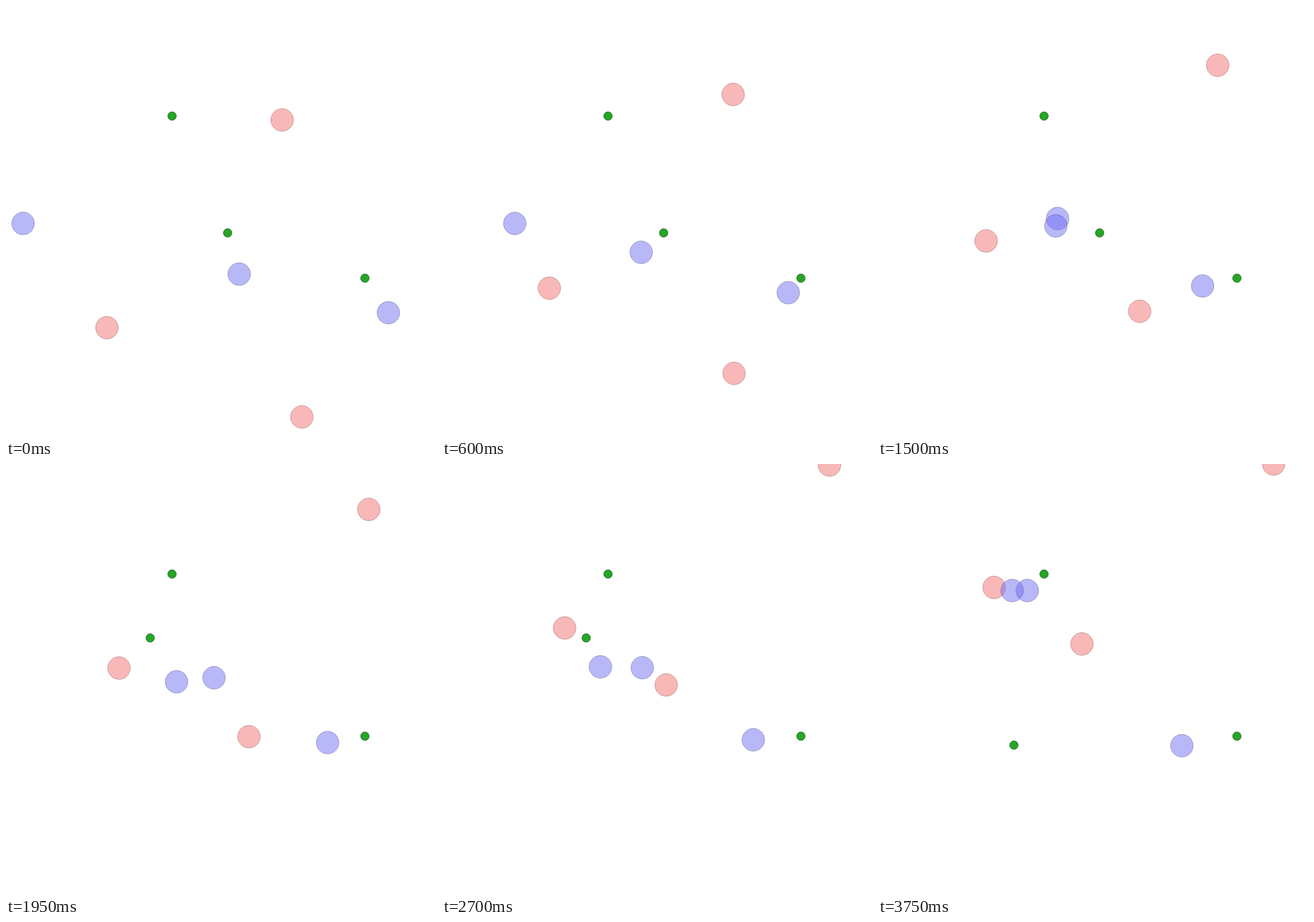
Recreate the animation shown at these times as an HTML page with a canvas. Size 700x700 px, loop 3900 ms.

```html
<!DOCTYPE html>
<html lang="en">
<head>
<meta charset="utf-8">
<title>Particles</title>
<style>
html, body { margin: 0; width: 100%; height: 100%; overflow: hidden; background: #fff; }
canvas { display: block; width: 100vw; height: 100vh; }
</style>
</head>
<body>
<canvas id="stage" width="700" height="700"></canvas>
<script>
const ctx = document.getElementById('stage').getContext('2d');
const STEP = 150, STEPS = 26, KEEP = 0.75;

const RED = ['rgba(242,108,108,.48)', 'rgba(121,57,57,.5)'];
const BLUE = ['rgba(108,108,242,.48)', 'rgba(57,57,121,.5)'];
const GREEN = ['#26a626', '#135313'];

// Each agent drifts through a few points, reached at these shared steps
const turns = [0, 4, 7, 10, 15, 21, 25];
const agents = [
  agent(RED, [449.5, 474, 509, 553, 612, 639.5, 644], [185.5, 144, 100, 96.5, 42, -30, -50]),
  agent(RED, [164.3, 174.7, 177, 176, 193.7, 198, 189], [523.7, 459.3, 432, 382.4, 304, 233, 201]),
  agent(RED, [481.6, 475.4, 456.5, 426, 376.4, 367, 332], [669, 598, 545, 497, 405.6, 323.3, 293]),
  agent(BLUE, [27.8, 118.5, 205, 292.3, 350.5, 271, 243], [354, 354, 346.7, 346, 349, 299.4, 206]),
  agent(BLUE, [379.6, 324.3, 310, 289.5, 277, 223.3, 218.3], [436.4, 401, 372, 358, 354.8, 285.5, 206]),
  agent(BLUE, [622.5, 563.7, 532, 528.4, 516, 500, 494.7], [499.3, 466.7, 457.6, 455.8, 451.8, 446, 458.6])
];

function agent(color, xs, ys) {
  return { color, x: glide(xs), y: glide(ys) };
}

// Damped motion under a constant push between turns
function glide(points) {
  let pos = points[0];
  let v = 0.7 * (points[1] - pos) / turns[1];
  const path = [pos];
  for (let i = 1; i < turns.length; i++) {
    const n = turns[i] - turns[i - 1];
    const coast = KEEP * (1 - KEEP ** n) / (1 - KEEP);
    const gain = (n - coast) / (1 - KEEP);
    const push = (points[i] - pos - v * coast) / gain;
    for (let k = 0; k < n; k++) {
      v = v * KEEP + push;
      pos += v;
      path.push(pos);
    }
  }
  return path;
}

function disc(x, y, r, [fill, line]) {
  ctx.beginPath();
  ctx.arc(x, y, r, 0, 2 * Math.PI);
  ctx.fillStyle = fill;
  ctx.fill();
  ctx.strokeStyle = line;
  ctx.lineWidth = 0.8;
  ctx.stroke();
}

function draw(step) {
  ctx.fillStyle = '#fff';
  ctx.fillRect(0, 0, 700, 700);
  for (const a of agents) disc(a.x[step], Math.max(0, a.y[step]), 18.4, a.color);
  // The middle prize jumps away each time it is caught
  const prize = step < 13 ? [360.8, 369.4] : step < 20 ? [234.7, 283.2] : [221.3, 457.6];
  for (const [x, y] of [[270.3, 179.2], prize, [584.3, 443.1]]) disc(x, y, 6.9, GREEN);
}

const start = performance.now();
function tick() {
  draw(Math.floor((performance.now() - start) / STEP) % STEPS);
  requestAnimationFrame(tick);
}
tick();
</script>
</body>
</html>
```
